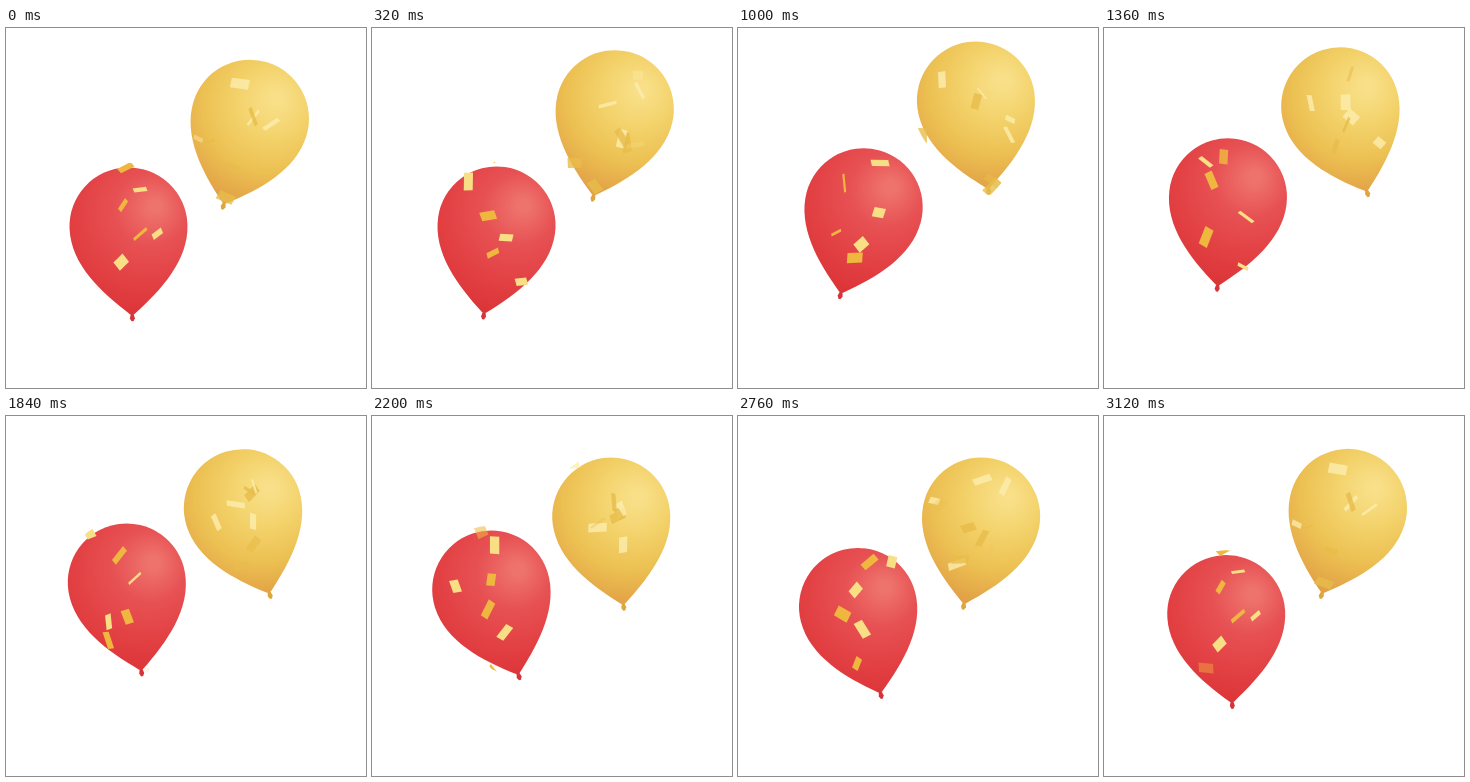
An HTML page with a canvas that plays this animation: 360x360 px, repeating every 3.16 s.

```html
<!DOCTYPE html>
<html lang="en">
<head>
<meta charset="utf-8">
<title>Balloons</title>
<style>
html, body { margin: 0; width: 100%; height: 100%; overflow: hidden; background: #fff; }
canvas { display: block; width: 100vw; height: 100vh; }
</style>
</head>
<body>
<canvas width="360" height="360"></canvas>
<script>
const ctx = document.querySelector('canvas').getContext('2d');
const LOOP = 3160, STEP = 40, PIECES = 22, RAD = Math.PI / 180;
const sin = deg => Math.sin(deg * RAD), cos = deg => Math.cos(deg * RAD);

let seed = 11;
const random = (min, max) => {
  seed = seed * 16807 % 2147483647;
  return min + (max - min) * seed / 2147483647;
};

// Each swing takes the loop phase in degrees.
const balloons = [
  {
    x: p => 122.5 + 3.5 * sin(p),
    y: p => 182.3 + 16.5 * cos(p - 13),
    tilt: p => 1.5 - 17.5 * sin(p - 3),
    colors: ['#ee736d', '#e75153', '#e34245', '#dc3538'],
    knot: '#d5343a', paper: ['#f8de85', '#f0b740'],
    speed: .15, life: 1000, alpha: 1,
    startX: () => 122 + random(-20, 20) + random(-20, 20),
    startY: () => random(98, 122)
  },
  {
    x: p => 240 + 4 * cos(p + 8),
    y: p => 87.5 + 15.3 * cos(p - 282),
    tilt: p => 1.2 - 18.2 * cos(p - 2),
    colors: ['#f8df88', '#f3d26a', '#ecc052', '#e2a146'],
    knot: '#dfa63c', paper: ['#fdeeae', '#e8bd4c'],
    speed: .065, life: 1200, alpha: .8,
    startX: () => 240 + random(-28, 28) + random(-22, 22),
    startY: () => random(35, 105)
  }
];

for (const b of balloons) {
  b.pieces = Array.from({ length: PIECES }, (_, i) => ({
    birth: i / PIECES * LOOP,
    x: b.startX(), y: b.startY(), drift: random(-.012, .012),
    long: random(10, 19), short: random(6, 10),
    angle: random(0, 180), turn: random(-.1, .1),
    flip: random(0, 180), flipSpeed: random(.2, .4),
    color: b.paper[i % 2]
  }));
}

function bodyPath(tilt, scale) {
  ctx.save();
  ctx.rotate(-tilt * RAD);
  ctx.scale(scale, scale);
  ctx.beginPath();
  ctx.arc(0, 0, 59, Math.PI, 0);
  ctx.bezierCurveTo(59, 36, 30, 65, 2, 88);
  ctx.lineTo(-2, 88);
  ctx.bezierCurveTo(-30, 65, -59, 36, -59, 0);
  ctx.restore();
}

function drawBalloon(b, tilt) {
  ctx.save();
  ctx.rotate(-tilt * RAD);
  ctx.fillStyle = b.knot;
  ctx.beginPath();
  ctx.moveTo(-1, 86);
  ctx.lineTo(1, 86);
  ctx.lineTo(2.5, 92);
  ctx.lineTo(1, 95);
  ctx.lineTo(-1, 95);
  ctx.lineTo(-2.5, 92);
  ctx.fill();
  ctx.restore();

  bodyPath(tilt, 1);
  const light = ctx.createRadialGradient(27, -20, 6, 15, -10, 98);
  b.colors.forEach((c, i) => light.addColorStop(i / 3, c));
  ctx.fillStyle = light;
  ctx.fill();
}

function drawPaper(b, t) {
  for (const p of b.pieces) {
    const age = (t - p.birth + LOOP) % LOOP;
    if (age > b.life) continue;
    const edge = Math.sin(age / b.life * Math.PI);
    const short = 1.5 + p.short * Math.abs(cos(p.flip + p.flipSpeed * age));
    ctx.save();
    ctx.translate(p.x + p.drift * age, p.y + b.speed * age);
    ctx.rotate((p.angle + p.turn * age) * RAD);
    ctx.transform(1, 0, .3 * sin(p.flip + p.flipSpeed * age), 1, 0, 0);
    ctx.globalAlpha = b.alpha * Math.min(1, edge * 4);
    ctx.fillStyle = p.color;
    ctx.fillRect(-p.long / 2, -short / 2, p.long, short);
    ctx.restore();
  }
}

function draw(now) {
  const t = Math.floor(now % LOOP / STEP) * STEP, phase = t / LOOP * 360;
  ctx.clearRect(0, 0, 360, 360);
  for (const b of balloons) {
    const x = b.x(phase), y = b.y(phase), tilt = b.tilt(phase);
    ctx.save();
    ctx.translate(x, y);
    drawBalloon(b, tilt);
    bodyPath(tilt, 1.08);
    ctx.clip();
    ctx.translate(-x, -y);
    drawPaper(b, t);
    ctx.restore();
  }
}

const start = performance.now();
function tick() {
  draw(performance.now() - start);
  requestAnimationFrame(tick);
}
tick();
</script>
</body>
</html>
```
